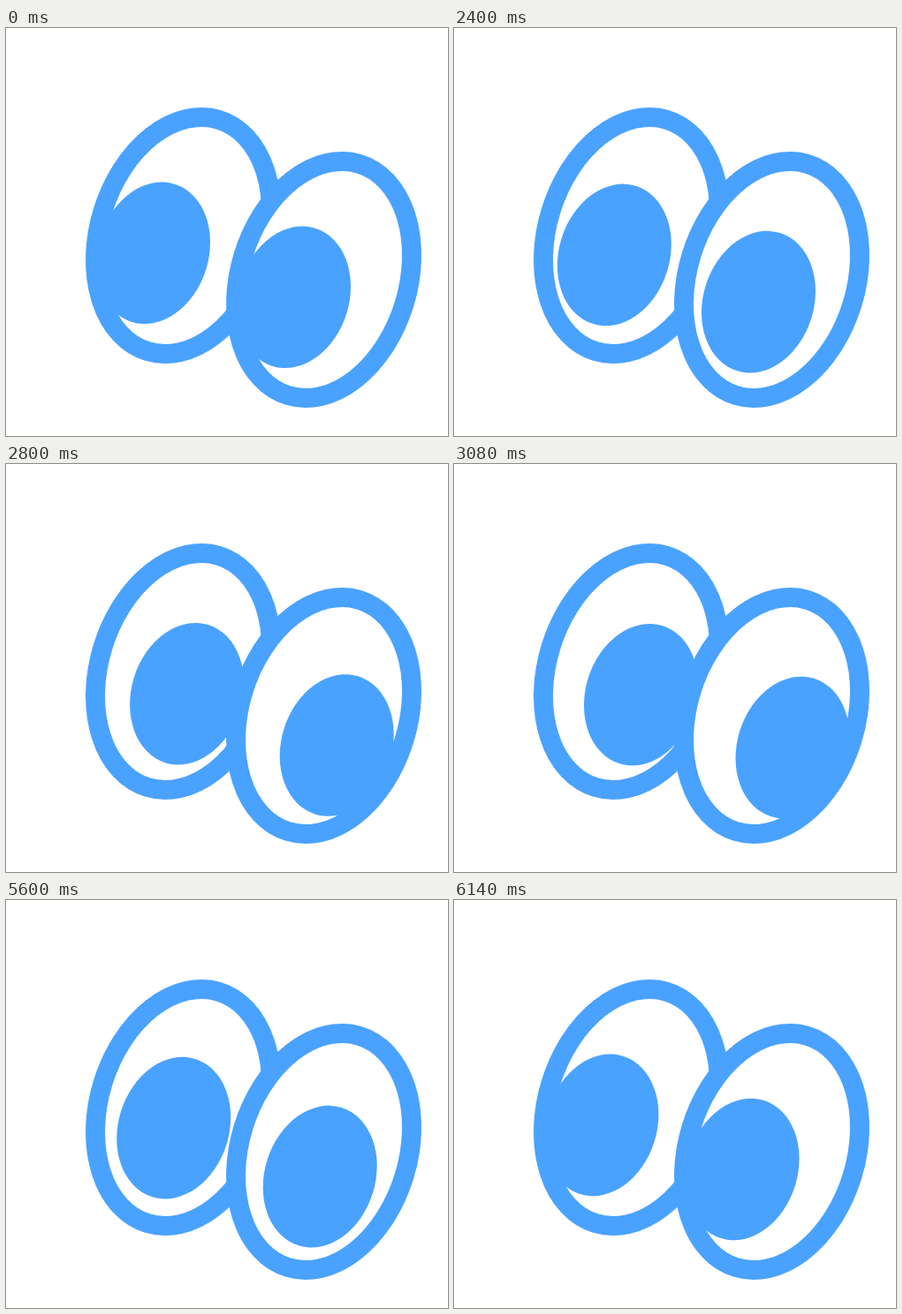
An HTML page for the animation above (6.24 s loop, 500 px wide and 462 px high).

```html
<!DOCTYPE html>
<html lang="en">
<head>
<meta charset="utf-8">
<title>Looking eyes</title>
<style>
  html, body { margin: 0; width: 100%; height: 100%; overflow: hidden; background: #fff; }
  svg { display: block; width: 100%; height: 100%; }
  .rim { fill: #fff; stroke: #4aa2ff; stroke-width: 22; }
  .pupil { fill: #4aa2ff; }
</style>
</head>
<body>
<svg viewBox="0 0 500 462">
  <g transform="translate(200.5 235)">
    <ellipse class="rim" rx="95.1" ry="137.2" transform="rotate(17.15)"/>
    <g id="left"><ellipse class="pupil" rx="62.6" ry="81.8" transform="rotate(17.15)"/></g>
  </g>
  <g transform="translate(359.5 285)">
    <ellipse class="rim" rx="95.1" ry="137.2" transform="rotate(17.15)"/>
    <g id="right"><ellipse class="pupil" rx="62.6" ry="81.8" transform="rotate(17.15)"/></g>
  </g>
</svg>
<script>
const LOOP = 6240, GO = 2260, BACK = 5340, STEPS = 18;
const START = [-34, 19.8];
const pupils = [
  { node: document.getElementById('left'), travel: [45, 6.4] },
  { node: document.getElementById('right'), travel: [57.5, 16.2] }
];

// Each 140 ms beat holds one pose for 100 ms, then two for 20 ms.
function stepAt(ms) {
  if (ms < 0) return 0;
  const r = ms % 140;
  const n = 3 * Math.floor(ms / 140) + 1 + (r >= 100) + (r >= 120);
  return Math.min(n, STEPS);
}

function ease(n) {
  return n >= STEPS ? 1 : Math.sin(Math.PI / 2 * n / 18.67);
}

function draw(t) {
  const look = ease(stepAt(t - GO)) - ease(stepAt(t - BACK));
  for (const { node, travel } of pupils) {
    const [x, y] = START.map((s, i) => s + travel[i] * look);
    node.setAttribute('transform', `translate(${x} ${y})`);
  }
}

const t0 = performance.now();
function tick() {
  draw((performance.now() - t0) % LOOP);
  requestAnimationFrame(tick);
}
draw(0);
requestAnimationFrame(tick);
</script>
</body>
</html>
```
